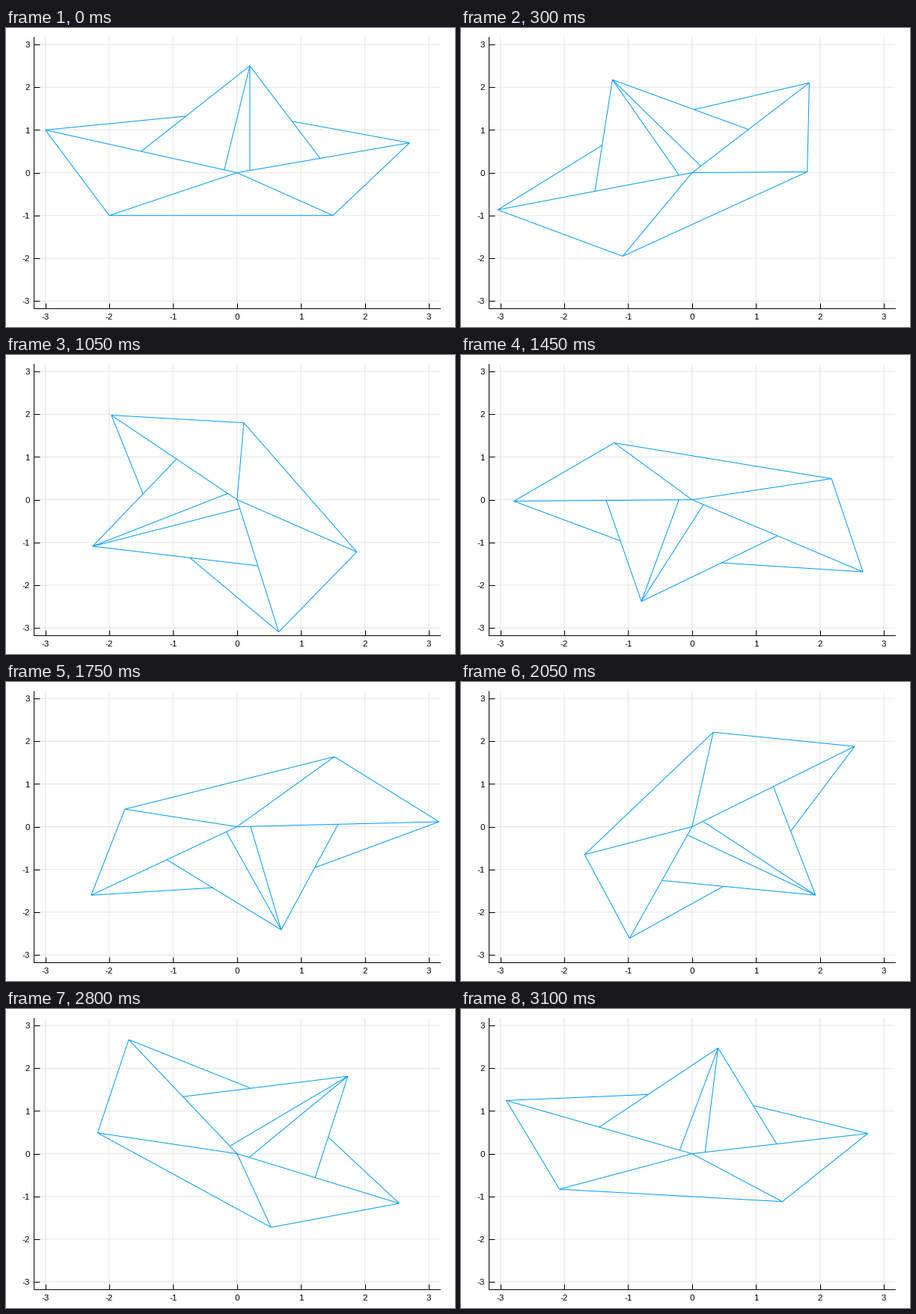
These frames come from a looping animation (600x400 px, 3150 ms). A matplotlib script:

```python
import numpy as np
import matplotlib.pyplot as plt
from matplotlib.animation import FuncAnimation

DPI, W, H = 100, 600, 400
PX = 72 / DPI  # one pixel in points
LEFT, RIGHT, TOP, BOTTOM = 37.2, 580.4, 11.8, 375.4
LIM = 3.18
STEP = 0.1  # radians per frame
FRAMES = 63
BLUE = "#009afa"

plt.rcParams["font.family"] = "Liberation Sans"


def mix(a, b, t):
    return tuple(p + (q - p) * t for p, q in zip(a, b))


# Corners of the boat and the points that lie on its edges
center, bow, stern = (0, 0), (-3, 1), (2.7, 0.7)
keel_l, keel_r, top = (-2, -1), (1.5, -1), (0.2, 2.5)
foot_l, foot_r = mix(center, bow, 0.5), mix(center, stern, 1.3 / 2.7)
mast_l, mast_r = mix(center, bow, 0.2 / 3), mix(center, stern, 0.2 / 2.7)
fold_l, fold_r = mix(foot_l, top, 0.7 / 1.7), mix(top, foot_r, 0.6)

paths = [np.array(p, float) for p in (
    [center, keel_l, keel_r, center],
    [keel_l, bow],
    [center, bow, fold_l],
    [keel_r, stern],
    [center, stern, fold_r],
    [foot_l, top, mast_l],
    [mast_r, top, foot_r],
)]

fig = plt.figure(figsize=(W / DPI, H / DPI), dpi=DPI, facecolor="white")
ax = fig.add_axes([LEFT / W, 1 - BOTTOM / H,
                   (RIGHT - LEFT) / W, (BOTTOM - TOP) / H])
ax.set(xlim=(-LIM, LIM), ylim=(-LIM, LIM))
ax.set_axisbelow(True)

ticks = range(-3, 4)
ax.set_xticks(ticks, [])
ax.set_yticks(ticks, [])
ax.tick_params(direction="in", length=7.5 * PX, width=PX)
ax.grid(color="black", alpha=0.1, linewidth=PX, snap=False)
ax.spines[["top", "right"]].set_visible(False)
ax.spines[["left", "bottom"]].set_linewidth(PX)


def label(v, xy, coords, offset, ha):
    ax.annotate(str(v), xy, xycoords=coords, xytext=offset,
                textcoords="offset pixels", ha=ha, va="baseline",
                fontsize=11.5 * PX, annotation_clip=False)


for v in ticks:
    label(v, (v, 0), ax.get_xaxis_transform(), (0, -14.6), "center")
    label(v, (0, v), ax.get_yaxis_transform(), (-5.4, -4.2), "right")

lines = [ax.plot([], [], color=BLUE, linewidth=PX, snap=False,
                 solid_joinstyle="miter", solid_capstyle="butt")[0]
         for _ in paths]


def update(i):
    c, s = np.cos(i * STEP), np.sin(i * STEP)
    turn = np.array([[c, s], [-s, c]])
    for line, path in zip(lines, paths):
        line.set_data(*(path @ turn).T)
    return lines


anim = FuncAnimation(fig, update, frames=FRAMES, interval=50,
                     repeat=True, repeat_delay=0)
plt.show()
```
